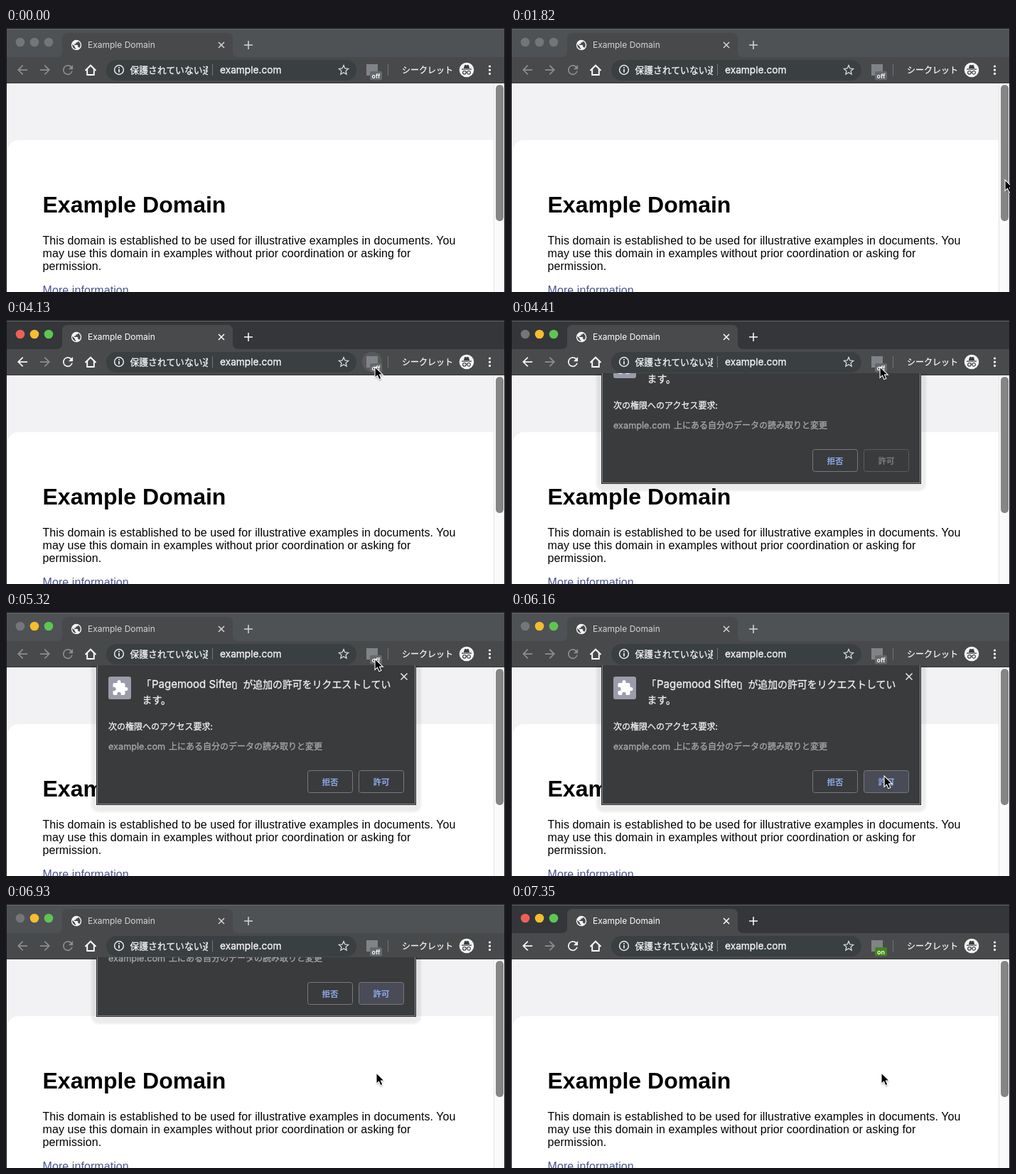
An HTML page that plays this animation: 702x372 px, repeating every 8.26 s.

```html
<!DOCTYPE html>
<html lang="ja">
<head>
<meta charset="utf-8">
<title>Example Domain</title>
<style>
  html, body { margin: 0; width: 100%; height: 100%; overflow: hidden; background: #fff; }
  svg { display: block; width: 702px; height: 372px; --strip: #4e5254; --bar: #48494b; --nav: #8b8d8f; --title: #d3d5d6;
    --red: #737678; --yellow: #737678; --green: #737678; }
  svg.active { --strip: #343639; --bar: #494a4c; --nav: #f4f5f5; --title: #fff; }
  svg.colored { --red: #ed6058; --yellow: #f6bd30; --green: #5fc552; }
  svg.sheet { --red: #747678; }
  .ui { font-family: Inter, "Noto Sans CJK JP", "Noto Sans CJK", sans-serif; }
  .jp { font-family: "Noto Sans CJK JP", "Noto Sans CJK", sans-serif; }
  .medium { fill: currentColor; stroke: currentColor; stroke-width: .3; }
  .page { font-family: "Liberation Sans", Arial, sans-serif; font-size: 16px; letter-spacing: .08px; }
  .page .heading { font-size: 32px; font-weight: 700; letter-spacing: 0; }
  .line { fill: none; stroke: #e9eaeb; stroke-width: 1.5; }
</style>
</head>
<body>
<svg id="stage" viewBox="0 0 702 372" xmlns="http://www.w3.org/2000/svg">
  <defs>
    <clipPath id="below"><path d="M0 75H702V372H0z"/></clipPath>
    <clipPath id="warning"><path d="M170 45H284V75H170z"/></clipPath>
    <filter id="soft" x="-10%" y="-10%" width="120%" height="125%"><feGaussianBlur stdDeviation="1.5"/></filter>
    <filter id="dim" x="-50%" y="-50%" width="200%" height="200%"><feGaussianBlur stdDeviation="1"/></filter>
    <path id="arrow" d="M20 11H7.83l5.59-5.59L12 4l-8 8 8 8 1.41-1.41L7.83 13H20z"/>
  </defs>

  <!-- web page -->
  <path d="M0 0H702V372H0z" fill="#f2f2f4"/>
  <path d="M2 372V174a16 16 0 0 1 16-16H687V372z" fill="#fff"/>
  <g class="page">
    <text class="heading" x="51.5" y="260">Example Domain</text>
    <text x="51.5" y="305">This domain is established to be used for illustrative examples in documents. You</text>
    <text x="51.5" y="323">may use this domain in examples without prior coordination or asking for</text>
    <text x="51.5" y="341">permission.</text>
    <text x="51.5" y="375" fill="#4a5590">More information...</text>
  </g>
  <path d="M686 78H702V372H686z" fill="#fafafa"/>
  <path d="M686.5 78V372" stroke="#e2e2e2"/>
  <rect x="689" y="80" width="11" height="192" rx="5.5" fill="#858585"/>

  <!-- tab strip and toolbar -->
  <path d="M0 0H702V42H0z" fill="var(--strip)"/>
  <path d="M0 41H71q8 0 8-8V15q0-8 8-8H311q8 0 8 8V33q0 8 8 8H702V78H0z" fill="var(--bar)"/>
  <path d="M0 77.5H702" stroke="#303234"/>
  <circle cx="20" cy="20" r="6.3" fill="var(--red)"/>
  <circle cx="40" cy="20" r="6.3" fill="var(--yellow)"/>
  <circle cx="60" cy="20" r="6.3" fill="var(--green)"/>
  <path transform="translate(90.4 15.4) scale(.72)" fill="#f4f5f5" d="M12 2a10 10 0 1 0 0 20 10 10 0 0 0 0-20zm-1 17.93c-3.95-.49-7-3.85-7-7.93 0-.62.08-1.21.21-1.79L9 15v1c0 1.1.9 2 2 2zm6.9-2.54c-.26-.81-1-1.39-1.9-1.39h-1v-3c0-.55-.45-1-1-1H8v-2h2c.55 0 1-.45 1-1V7h2c1.1 0 2-.9 2-2v-.41c2.93 1.19 5 4.06 5 7.41 0 2.08-.8 3.97-2.1 5.39z"/>
  <text class="ui" x="115" y="28" font-size="12" fill="var(--title)">Example Domain</text>
  <path class="line" d="M299 20l8 8m0-8l-8 8M335 24h12m-6-6v12" style="stroke: var(--title)"/>
  <use href="#arrow" transform="translate(12.5 48.5) scale(.88)" fill="var(--nav)"/>
  <use href="#arrow" transform="translate(65.5 48.5) scale(-.88 .88)" fill="#8b8d8f"/>
  <path transform="translate(76.5 48.5) scale(.88)" fill="var(--nav)" d="M17.65 6.35A8 8 0 1 0 19.73 14h-2.08A6 6 0 1 1 12 6c1.66 0 3.14.69 4.22 1.78L13 11h7V4z"/>
  <path d="M111.5 60l7.5-7.3 7.5 7.3M114.2 58v8h9.6v-8" fill="none" stroke="#fff" stroke-width="1.9"/>

  <rect x="141" y="45" width="352" height="29" rx="14.5" fill="#3a3f41"/>
  <circle class="line" cx="159" cy="59" r="6.4"/>
  <path d="M159 58v4.5M159 55v1.7" stroke="#f0f1f1" stroke-width="1.7"/>
  <g class="jp medium" color="#f4f5f5">
    <text x="174.5" y="63.5" font-size="12.8" clip-path="url(#warning)">保護されていない通信</text>
    <text x="557" y="63.5" font-size="12">シークレット</text>
    <text class="ui" x="301" y="64" font-size="13.7">example.com</text>
  </g>
  <path d="M290.5 51V67M537.5 51V67" stroke="#727577"/>
  <path d="M475 52.6l1.9 4.3 4.7.5-3.5 3.1 1 4.6-4.1-2.4-4.1 2.4 1-4.6-3.5-3.1 4.7-.5z" fill="none" stroke="#d6d8d9" stroke-width="1.3"/>
  <circle id="halo" cx="515" cy="59" r="14" fill="#58595b"/>
  <path d="M507 51H523V67H507z" fill="#808387"/>
  <rect id="badge" x="512" y="61" width="17" height="12.5" rx="2"/>
  <text id="state" class="ui" x="520.5" y="71" font-size="9" font-weight="600" fill="#fff" text-anchor="middle"></text>
  <circle cx="648" cy="59" r="10.3" fill="#f3f4f4"/>
  <path d="M643.8 57l1.3-4.5q.3-.8 1.2-.5l1.7.5 1.7-.5q.9-.3 1.2.5l1.3 4.5zM641 57.6h14v1.2h-14z" fill="#3b3e40"/>
  <path d="M642.6 62.8a2.3 2.3 0 1 0 4.6 0 2.3 2.3 0 1 0-4.6 0M648.8 62.8a2.3 2.3 0 1 0 4.6 0 2.3 2.3 0 1 0-4.6 0M647 62.3q1-.7 2 0" fill="none" stroke="#3b3e40" stroke-width="1.2"/>
  <path d="M680.5 54h0M680.5 59.2h0M680.5 64.4h0" stroke="#fff" stroke-width="3.2" stroke-linecap="round"/>

  <!-- window edge -->
  <path d="M0 1.5H702" stroke="#6b6e70"/>
  <path d="M.5 372V.5H701.5V372" fill="none" stroke="#141516"/>

  <!-- permission sheet -->
  <g clip-path="url(#below)">
    <g id="sheet">
      <rect x="120" y="68" width="464" height="214" rx="10" opacity=".07" filter="url(#soft)"/>
      <path d="M127 70H577V272H127z" fill="#2b2d2e"/>
      <path d="M128.5 70.5H575.5V270.5H128.5z" fill="#393b3d" stroke="#85878a"/>
      <rect x="144" y="91" width="32" height="32" rx="3" fill="#9a9ca9"/>
      <path transform="translate(148.5 95)" fill="#fff" d="M20.5 11H19V7c0-1.1-.9-2-2-2h-4V3.5a2.5 2.5 0 0 0-5 0V5H4c-1.1 0-2 .9-2 2v3.8h1.5a2.7 2.7 0 0 1 0 5.4H2V20c0 1.1.9 2 2 2h3.8v-1.5a2.7 2.7 0 0 1 5.4 0V22H17c1.1 0 2-.9 2-2v-4h1.5a2.5 2.5 0 0 0 0-5z"/>
      <g class="jp medium" font-size="13.9" color="#f0f1f1">
        <text x="190.5" y="107">「</text>
        <text class="ui" x="205" y="107" font-size="15">Pagemood Sifter</text>
        <text x="319.5" y="107">」が追加の許可をリクエストしてい</text>
        <text x="191.5" y="129">ます。</text>
      </g>
      <path class="line" d="M555.5 86.5l9 9m0-9l-9 9"/>
      <g class="jp" font-size="12">
        <text class="medium" x="144" y="165.5" color="#f0f1f1">次の権限へのアクセス要求:</text>
        <g class="medium" color="#a6a8aa">
          <text class="ui" x="144" y="194" font-size="12.7">example.com</text>
          <text x="229" y="193.5">上にある自分のデータの読み取りと変更</text>
        </g>
      </g>
      <g class="jp" font-size="11.5" font-weight="700" text-anchor="middle">
        <rect x="424.5" y="223.5" width="63" height="31" rx="3" fill="none" stroke="#77797c"/>
        <text x="456" y="243.5" fill="#8fabeb">拒否</text>
        <rect id="allow" x="496.5" y="223.5" width="63" height="31" rx="3"/>
        <text id="allowText" x="528" y="243.5">許可</text>
      </g>
    </g>
  </g>

  <g id="cursor">
    <path d="M0 2V17l3.5-3.2L6 19.5l3-1.3-2.4-5.4h5z" opacity=".4" filter="url(#dim)"/>
    <path d="M0 0V15.4l3.5-3.2 2.4 5.6 3-1.3-2.4-5.4h4.8z" fill="#000" stroke="#fff" stroke-width="1.1"/>
  </g>
</svg>
<script>
const LOOP = 8260, STEP = 70, SHEET_HEIGHT = 200;
const $ = id => document.getElementById(id);
const stage = $('stage');

// time, x, y of the pointer tip
const path = [
  [1820, 695, 214], [2030, 630, 158], [2240, 570, 108], [2450, 531, 76], [2520, 527, 72],
  [2590, 526, 71], [2660, 520, 66], [2870, 519, 66], [5320, 519, 66], [5530, 572, 92],
  [5740, 609, 142], [5950, 560, 198], [6090, 528, 224], [6160, 525, 231], [6370, 521, 238], [LOOP, 521, 238]
];

const ease = (t, start, length) => {
  const p = Math.min(1, Math.max(0, (t - start) / length));
  return (1 - Math.cos(Math.PI * p)) / 2;
};

function pointer(t) {
  const i = path.findIndex(p => p[0] > t);
  const [a, b] = [path[i - 1], path[i]];
  const p = (t - a[0]) / (b[0] - a[0]);
  return [1, 2].map(k => a[k] + (b[k] - a[k]) * p);
}

function draw(t) {
  const between = (a, b) => t >= a && t < b;
  const open = ease(t, 4200, 300) - ease(t, 6740, 350);
  const enabled = t >= 4760, hover = t >= 6160, on = t >= 7140;

  stage.classList.toggle('active', between(4060, 4550) || on);
  stage.classList.toggle('colored', t >= 4060);
  stage.classList.toggle('sheet', between(4200, 7140));

  $('halo').style.display = between(4060, 4270) ? '' : 'none';
  $('badge').setAttribute('fill', on ? '#43851b' : '#66696c');
  $('state').textContent = on ? 'on' : 'off';

  $('sheet').style.display = open > 0.001 ? '' : 'none';
  $('sheet').setAttribute('transform', `translate(0 ${Math.round((open - 1) * SHEET_HEIGHT)})`);
  $('allow').setAttribute('fill', hover ? '#494b57' : 'none');
  $('allow').setAttribute('stroke', enabled ? '#77797c' : '#5b5d5f');
  $('allowText').setAttribute('fill', enabled ? '#8fabeb' : '#7b7d7f');

  const visible = t >= path[0][0];
  $('cursor').style.display = visible ? '' : 'none';
  if (visible) $('cursor').setAttribute('transform', `translate(${pointer(t)})`);
}

const start = performance.now();
function tick() {
  const t = (performance.now() - start) % LOOP;
  draw(Math.floor(t / STEP) * STEP);
  requestAnimationFrame(tick);
}
tick();
</script>
</body>
</html>
```
